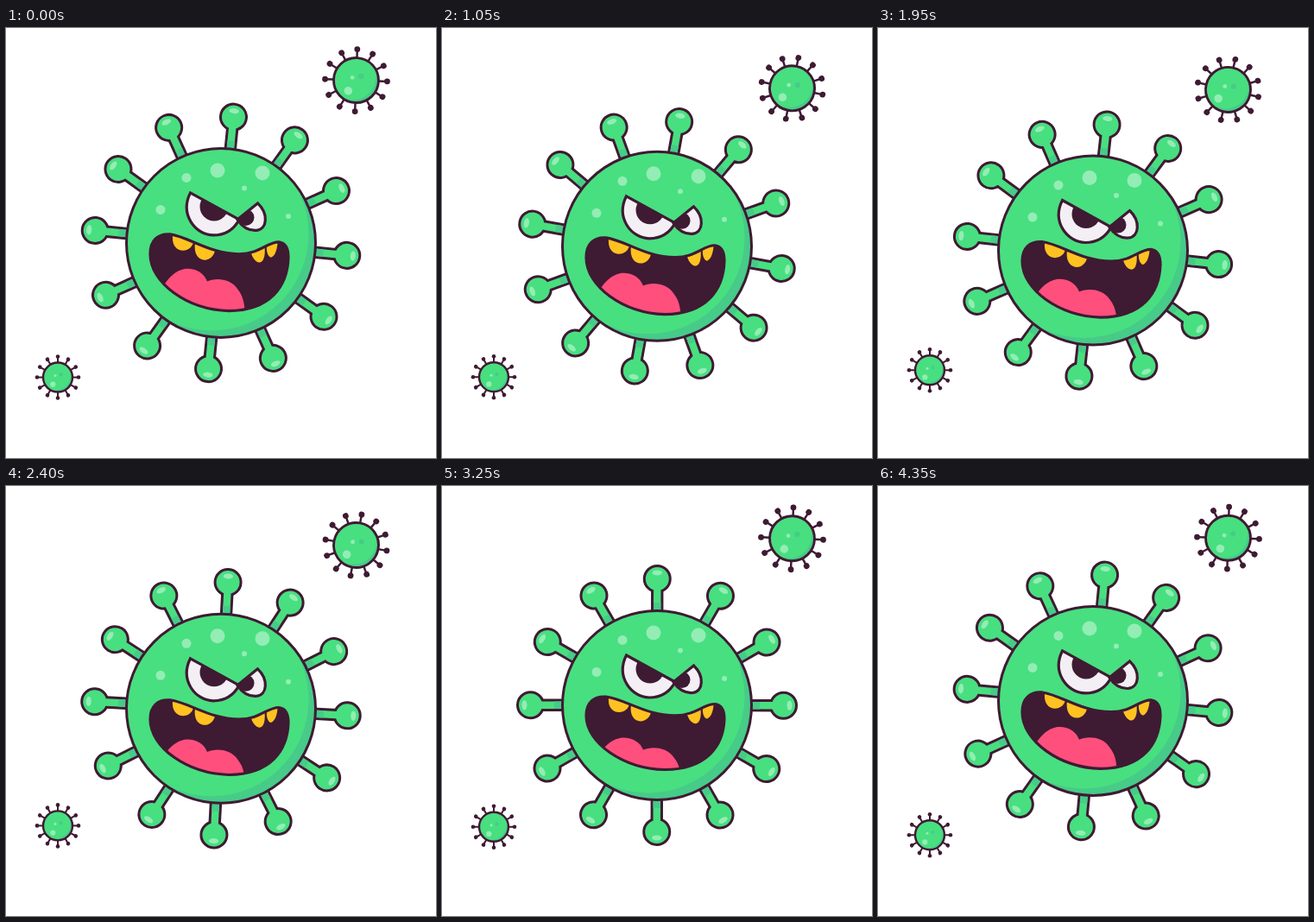
Animation, 498 px wide and 498 px high, one loop 4400 ms. Source, as an HTML page:

```html
<!DOCTYPE html>
<html lang="en">
<head>
<meta charset="utf-8">
<title>Angry virus</title>
<style>
  html, body { margin: 0; width: 100%; height: 100%; overflow: hidden; background: #fff; }
  svg { display: block; width: 100vw; height: 100vh; }
  .line { fill: none; stroke: #3f1a33; }
  .dark { fill: #3f1a33; }
  .green { fill: #48df80; }
  .shade { fill: #46cb88; }
  .light { fill: #93edb4; }
  .white { fill: #f3eff4; }
  .tooth { fill: #ffc220; }
  .tongue { fill: #ff4f7d; }
</style>
</head>
<body>
<svg viewBox="0 0 498 498">
  <defs>
    <clipPath id="disc"><circle r="109"/></clipPath>
    <path id="mouthShape" d="M167 262C167 246 176 238 190 239C212 242 236 262 270 262C294 262 302 248 316 248C324 249 327 255 327 266C326 300 306 328 258 328.5C210 327 167 296 167 262Z"/>
    <clipPath id="mouthClip"><use href="#mouthShape"/></clipPath>
    <path id="eyeL" d="M213.500 191L270 222C263 235 253 240 240 240C219 239.500 201 216 213.500 191Z"/>
    <clipPath id="eyeLClip"><use href="#eyeL"/></clipPath>
    <path id="eyeR" d="M291.500 203L268 222C274 231 282 235 290 234.500C303 233 304 215 291.500 203Z"/>
    <clipPath id="eyeRClip"><use href="#eyeR"/></clipPath>
    <g id="spike">
      <g class="line" stroke-width="6">
        <circle cy="-146.500" r="13.500"/>
        <path d="M-4.200 -100V-138H4.200V-100Z"/>
      </g>
      <circle class="green" cy="-146.500" r="13.500"/>
      <path class="green" d="M-4.200 -100V-138H4.200V-100Z"/>
      <path class="shade" d="M-4.200 -100V-119H4.200V-100Z"/>
      <ellipse class="light" cy="-153.500" rx="5.700" ry="3"/>
    </g>
  </defs>

  <g id="main">
    <g id="spikes"></g>
    <g id="body"></g>
    <g id="spots" class="light"></g>
    <circle class="line" r="109.500" stroke-width="3"/>
    <g transform="translate(-249 -249)">
      <g id="mouth">
        <g transform="translate(0 -240)">
          <use href="#mouthShape" class="dark"/>
          <g clip-path="url(#mouthClip)">
            <path id="tongue" class="tongue" d="M180 303C189 284 202 278 210 278C221 278 230 284 233 293C241 289 260 288 269 303C275 311 277 320 277 340H180Z"/>
            <path class="tooth" d="M193 230V241C192 252 198 258 205 258C211 258 216 254 217 248V230Z"/>
            <path class="tooth" d="M219 240V249C217 262 223 269 230 269C236 269 241 264 242 258V240Z"/>
            <path class="tooth" d="M284 250V261C286 268 290 272 294 272C299 271 301 262 299 250Z"/>
            <path class="tooth" d="M302 240V251C301 260 304 266 307 266C312 264 315 256 315 240Z"/>
          </g>
          <use href="#mouthShape" class="line" stroke-width="3.200"/>
        </g>
      </g>
      <use href="#eyeL" class="white"/>
      <circle class="dark" cx="241" cy="207" r="16.500" clip-path="url(#eyeLClip)"/>
      <use href="#eyeR" class="white"/>
      <circle class="dark" cx="278" cy="219.500" r="9.500" clip-path="url(#eyeRClip)"/>
      <g class="line" stroke-width="3.200">
        <use href="#eyeL"/>
        <use href="#eyeR"/>
      </g>
    </g>
  </g>
  <g id="top"></g>
  <g id="low"></g>
</svg>

<script>
  const LOOP = 4400, STEP = 50;
  const $ = id => document.getElementById(id);
  const circle = (x, y, r, cls = '') => `<circle class="${cls}" cx="${x}" cy="${y}" r="${r}"/>`;
  const ring = draw => Array.from({ length: 12 }, (_, i) => `<g transform="rotate(${i * 30})">${draw}</g>`).join('');
  // shaded disc; shift sets the width of the crescent
  const ball = (r, shift) => `<g transform="scale(${r / 109})" clip-path="url(#disc)">` +
    circle(0, 0, 109, 'shade') + circle(-shift, -shift, 112, 'green') + '</g>';

  $('spikes').innerHTML = ring('<use href="#spike"/>');
  $('body').innerHTML = ball(109, 10.5);
  $('spots').innerHTML = [
    [-4, -84, 8.5], [-40, -75.5, 5.5], [48, -81, 8.5],
    [27, -63.5, 3], [-70, -38.5, 5.5], [78, -31, 3]
  ].map(s => circle(...s)).join('');

  // r: body radius, reach: distance of the spike tips, tip: tip radius
  function smallVirus(r, reach, tip, line) {
    const k = r / 26;
    return ring(`<path class="line" stroke-width="${line * 0.85}" d="M0 ${-r}V${-reach}"/>` + circle(0, -reach, tip, 'dark')) +
      ball(r, 16) +
      circle(-8.7 * k, 12.5 * k, 4.8 * k, 'light') +
      circle(-4.5 * k, -3 * k, 2.4 * k, 'light') +
      circle(5.5 * k, -5 * k, 3 * k, 'shade') +
      `<circle class="line" r="${r}" stroke-width="${line}"/>`;
  }
  $('top').innerHTML = smallVirus(26, 36, 3.4, 2.9);
  $('low').innerHTML = smallVirus(17, 24, 2.3, 2.4);

  const place = (id, x, y, more = '') => $(id).setAttribute('transform', `translate(${x} ${y}) ${more}`);

  function draw(t) {
    // cosine wave peaking at a given time, n cycles per loop
    const wave = (peak, n = 1) => Math.cos(2 * Math.PI * n * (t - peak) / LOOP);

    place('main', 249, 253.4 - 4.5 * wave(40));
    place('spikes', 0, 0, `rotate(${5.1 + 5 * wave(1020)})`);

    // the jaw closes towards the upper lip
    const jaw = -2.2 + 2.2 * wave(850) + 0.7 * wave(150, 2);
    const tongue = 4.5 - 4 * wave(850) - wave(0, 2) - 1.3 * wave(0, 3);
    place('mouth', 0, 240, `scale(1 ${1 + jaw / 89})`);
    place('tongue', 0, tongue - 0.43 * jaw);

    const bob = wave(1640);
    place('top', 405.5, 65.3 + 6.8 * bob, `rotate(${7 + 7 * bob})`);
    place('low', 60, 399.5 + 6.7 * wave(500));
  }

  function frame(now) {
    draw(Math.floor(now % LOOP / STEP) * STEP);
    requestAnimationFrame(frame);
  }
  draw(0);
  requestAnimationFrame(frame);
</script>
</body>
</html>
```
